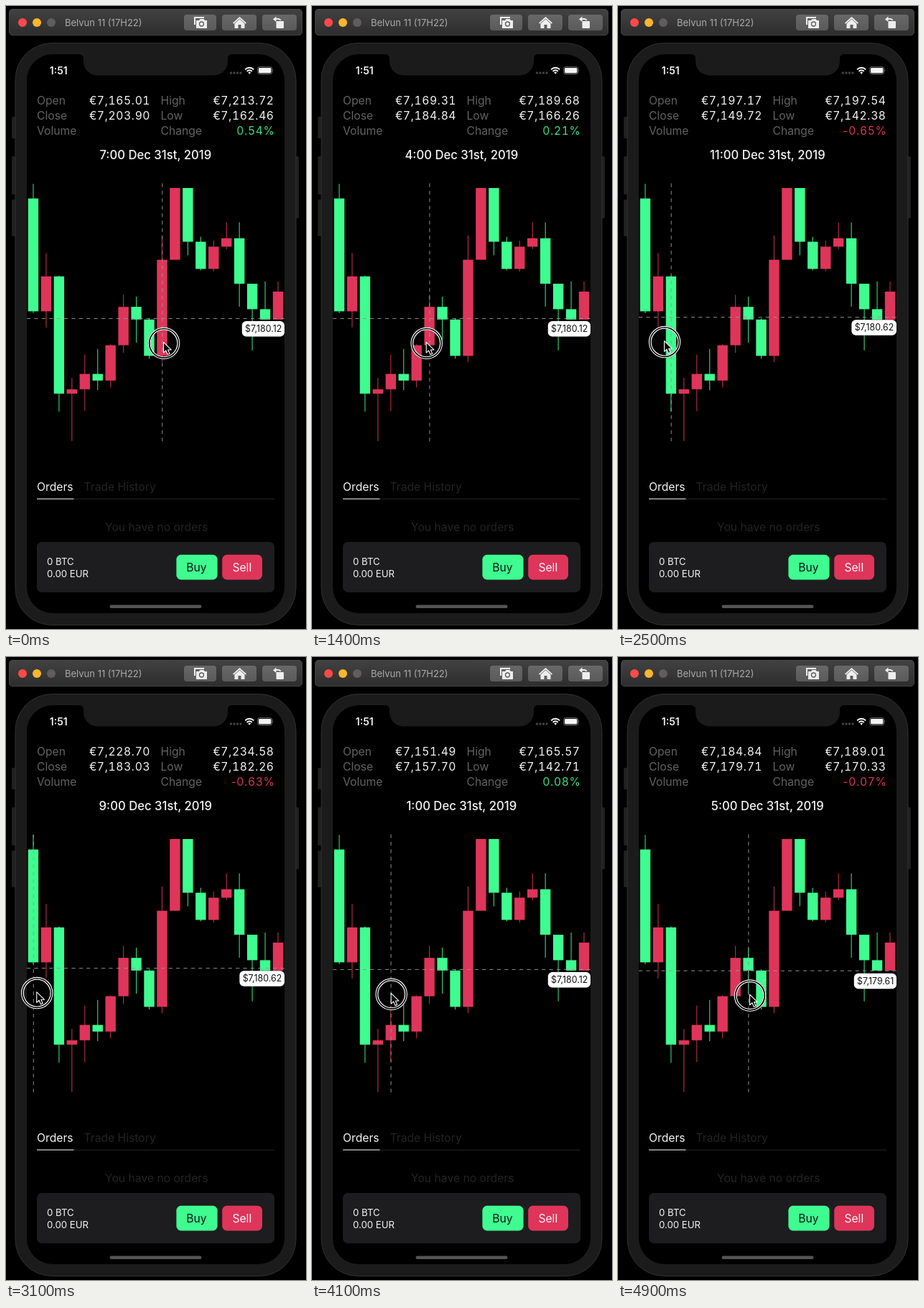
Animation of 418 by 866 pixels, one loop 5000 ms. Source, as an HTML page:

```html
<!DOCTYPE html>
<html lang="en">
<head>
<meta charset="utf-8">
<title>Candlestick chart</title>
<style>
  html, body { margin: 0; width: 100%; height: 100%; overflow: hidden; background: #000; }
  svg { display: block; width: 418px; height: 866px; font-family: Inter, "Open Sans", sans-serif; font-size: 15.7px; fill: #f4f4f4; }
  .dim { fill: #626264; }
  .faint { fill: #232325; }
  .value { text-anchor: end; letter-spacing: .5px; }
  .tab { font-variant-numeric: tabular-nums; }
  .mid { text-anchor: middle; }
  .line { fill: none; stroke: #fff; }
  .cross { stroke: #969696; stroke-width: .95; stroke-dasharray: 5.2 5.2; }
</style>
</head>
<body>
<svg viewBox="0 0 418 866">
  <defs>
    <linearGradient id="bar" x2="0" y2="1">
      <stop stop-color="#424242"/><stop offset="1" stop-color="#2d2d2d"/>
    </linearGradient>
    <linearGradient id="key" x2="0" y2="1">
      <stop stop-color="#686868"/><stop offset="1" stop-color="#5a5a5a"/>
    </linearGradient>
  </defs>
  <rect width="418" height="866" fill="#000"/>

  <!-- window bar -->
  <rect x="4.5" y="4.5" width="408" height="36" rx="4.5" fill="url(#bar)" stroke="#505050" stroke-width=".8"/>
  <circle cx="23" cy="23" r="6" fill="#fc4a48"/>
  <circle cx="43" cy="23" r="6" fill="#fdb52d"/>
  <circle cx="63" cy="23" r="6" fill="#605d5c"/>
  <text x="82" y="28" font-size="13" fill="#a9a9a9">Belvun 11 (17H22)</text>
  <g fill="url(#key)">
    <rect x="248" y="12" width="45" height="22" rx="4"/>
    <rect x="301" y="12" width="48" height="22" rx="4"/>
    <rect x="357" y="12" width="48" height="22" rx="4"/>
  </g>
  <g fill="#eee">
    <path d="M262 15h14v2h-12v9h-2z"/>
    <path d="M265 20h4l1.5-2h5l1.5 2h3v11h-15z"/>
    <circle cx="272.5" cy="25" r="3" stroke="#5d5d5d" stroke-width="1.3"/>
    <path d="M316 23.500 325.500 15 335 23.500 333.800 24.800 325.500 17.400 317.200 24.800z"/>
    <path d="M318.500 24.500 325.500 18.300 332.500 24.500V31h-5v-5h-4v5h-5z"/>
    <rect x="376.500" y="21" width="10.500" height="10" rx="1"/>
    <path d="M372 18.500 376.500 14.500V17H380a4 4 0 0 1 3.500 3h-2a2.500 2.500 0 0 0-2-1H376.500V22z"/>
  </g>

  <!-- handset -->
  <g fill="#202020">
    <rect x="8" y="154" width="8" height="30" rx="1.5"/>
    <rect x="8" y="209" width="8" height="53" rx="1.5"/>
    <rect x="8" y="269" width="8" height="51" rx="1.5"/>
    <rect x="400" y="209" width="8" height="86" rx="1.5"/>
  </g>
  <rect x="13" y="51.500" width="391" height="809" rx="51" fill="#1b1b1b" stroke="#303030"/>
  <rect x="29" y="67" width="359" height="777" rx="36" fill="#000"/>
  <path d="M102 67q6 .5 6 6v4a19.500 19.500 0 0 0 19.500 19.500H289.500A19.500 19.500 0 0 0 309 77v-4q0-5.500 6-6z" fill="#1b1b1b"/>

  <!-- status -->
  <text x="60.800" y="94.500" font-size="14" font-weight="600">1:51</text>
  <path d="M313.500 93H328" stroke="#434343" stroke-width="3.400" stroke-linecap="round" stroke-dasharray="0 4.500"/>
  <g class="line" stroke-width="1.900">
    <path d="M333.200 88.300a8.500 8.500 0 0 1 12 0"/>
    <path d="M335.600 90.800a5 5 0 0 1 7.200 0"/>
  </g>
  <path d="M337.200 92.300a3 3 0 0 1 4 0l-2 2.400z"/>
  <rect x="350.700" y="84.700" width="20" height="9.800" rx="2.600" class="line" stroke-opacity=".5" stroke-width=".9"/>
  <rect x="352" y="86" width="17.400" height="7.200" rx="1.400"/>
  <path d="M371.700 88q1.600 1.600 0 3.200z" fill="#777"/>

  <!-- readout -->
  <g class="dim">
    <text x="43" y="136.500">Open</text><text x="215.500" y="136.500">High</text>
    <text x="43" y="157.500">Close</text><text x="215.500" y="157.500">Low</text>
    <text x="43" y="178.500">Volume</text><text x="215.500" y="178.500">Change</text>
  </g>
  <g class="value">
    <text id="open" x="201" y="136.500"/><text id="high" x="373.500" y="136.500"/>
    <text id="close" x="201" y="157.500"/><text id="low" x="373.500" y="157.500"/>
    <text id="change" x="374.300" y="178.500"/>
  </g>
  <text id="date" class="mid" x="208.300" y="213" font-size="16.700" font-weight="500"/>

  <g id="candles"/>

  <!-- orders -->
  <text x="43" y="673.500">Orders</text>
  <text x="108.500" y="673.500" class="faint">Trade History</text>
  <rect x="43" y="684.800" width="331" height="1" fill="#252527"/>
  <rect x="43" y="684.600" width="51.500" height="1"/>
  <text x="209.800" y="729.800" class="mid faint">You have no orders</text>
  <rect x="43" y="745" width="331" height="70" rx="7" fill="#1d1d1f"/>
  <g font-size="13.200">
    <text x="57" y="776.500">0 BTC</text>
    <text x="57" y="793.500">0.00 EUR</text>
  </g>
  <rect x="237.400" y="762.800" width="57.200" height="34.700" rx="6.500" fill="#3ffc90"/>
  <rect x="301.200" y="762.800" width="55.800" height="34.700" rx="6.500" fill="#df355a"/>
  <text x="265.500" y="786.300" class="mid" fill="#101412">Buy</text>
  <text x="328.800" y="786.300" class="mid">Sell</text>
  <rect x="144.500" y="832.500" width="128" height="4.500" rx="2.250" fill="#555"/>

  <!-- crosshair and pointer -->
  <path id="vertical" class="cross" d="M0 246.500V605"/>
  <path id="horizontal" class="cross" d="M29 0H388"/>
  <g id="tag">
    <rect y="3.600" height="21.500" rx="6" fill="#fff"/>
    <text x="384.300" y="18.700" text-anchor="end" font-size="12.400" fill="#111"/>
  </g>
  <g id="pointer">
    <circle r="20.300" fill="none" stroke="#000" stroke-width="4"/>
    <circle r="21.700" class="line" stroke-width="1.100"/>
    <circle r="18.900" class="line" stroke-width="1.200"/>
    <path d="M-.5-1.500V13.200L2.900 10.100 5.300 15.600 8 14.400 5.600 9.100H10.200z" fill="#000" stroke="#fff" stroke-width="1.100" stroke-linejoin="round"/>
  </g>
</svg>

<script>
const $ = id => document.getElementById(id);
const GREEN = '#3ffc90', RED = '#df355a';
const LOOP = 5000, TICK = 100, LAG = 40;
const LEFT = 29, PITCH = 17.95;
const FIRST_OPEN = 7228.70, TOP_PRICE = 7180.62, PRICE_STEP = .1262;

// Each hour: close, then the wick above and below the body. It opens at the previous close.
const hours = [
  [7183.03, 5.88, .77], [7197.17, 9.5, 6.5], [7149.72, .37, 7.34], [7151.49, 4.6, 19.2],
  [7157.70, 7.87, 8.78], [7155.01, 10.06, 3.9], [7169.31, .4, 2.7], [7184.84, 4.84, 3.05],
  [7179.71, 4.17, 9.38], [7165.01, .5, 1.1], [7203.90, 9.82, 2.55], [7232.93],
  [7211.2, 0, 5.5], [7200.2, 2, .6], [7209.2, 2.5, 1], [7212.6, 6.4, 1],
  [7194.2, 6.4, 9.3], [7183.9, 0, 16.7], [7179.7, 11.2], [7191, 4.1],
];
const candles = hours.map(([close, above = 0, below = 0], i) => {
  const open = i ? hours[i - 1][0] : FIRST_OPEN;
  return { open, close, high: Math.max(open, close) + above, low: Math.min(open, close) - below };
});

const priceY = price => 319 + (7213.72 - price) * 3.435;
const slotX = i => LEFT + (i + .5) * PITCH;
const money = n => n.toLocaleString('en-US', { minimumFractionDigits: 2, maximumFractionDigits: 2 });

const ramp = (t, from, to) => Math.min(1, Math.max(0, (t - from) / (to - from)));
const easeOut = (u, power) => 1 - (1 - u) ** power;

// The pointer sweeps left, slows to a stop, then returns.
const comeBack = t => easeOut(ramp(t, 3500, 4900), 1.2);
const pointerX = t => 220 - 155 * ramp(t, 700, 2500)
  - 24.5 * easeOut(ramp(t, 2500, 3400), 2) + 143.5 * comeBack(t);
const priceSteps = t => Math.round(4 - 4 * ramp(t, 1400, 2100) + 8 * comeBack(t));

$('candles').innerHTML = candles.map(({ open, close, high, low }, i) => {
  const x = slotX(i), color = close < open ? GREEN : RED;
  const top = priceY(Math.max(open, close)), bottom = priceY(Math.min(open, close));
  return `<path d="M${x} ${priceY(high)}V${priceY(low)}" stroke="${color}" stroke-width="1.1" stroke-opacity=".85"/>
    <rect x="${x - 7.2}" y="${top}" width="14.4" height="${bottom - top}" fill="${color}"/>`;
}).join('');

// Only the digits are tabular; punctuation keeps its own width.
const setValue = (id, text) => {
  $(id).innerHTML = text.replace(/\d+/g, '<tspan class="tab">$&</tspan>');
};

function showCandle(i) {
  const { open, close } = candles[i];
  Object.entries(candles[i]).forEach(([id, price]) => setValue(id, '€' + money(price)));
  const change = Math.trunc((close - open) / open * 1e4) / 100;
  setValue('change', change.toFixed(2) + '%');
  $('change').style.fill = change < 0 ? '#d63354' : '#3bdd80';
  $('date').textContent = `${(i + 8) % 12 + 1}:00 Dec 31st, 2019`;
}

const move = (id, x, y) => $(id).setAttribute('transform', `translate(${x} ${y})`);

function render(time) {
  const t = Math.floor(time % LOOP / TICK) * TICK;
  const slot = Math.floor((pointerX(t - LAG) - LEFT) / PITCH);
  const price = TOP_PRICE - PRICE_STEP * priceSteps(t);
  const y = priceY(price);

  showCandle(slot);
  move('vertical', slotX(slot) + .3, 0);
  move('horizontal', 0, y);
  move('tag', 0, y);
  move('pointer', pointerX(t), y + 34.4);

  const [box, label] = $('tag').children;
  label.textContent = '$' + money(price);
  const width = label.getComputedTextLength() + 8;
  box.setAttribute('x', 388 - width);
  box.setAttribute('width', width);
}

const start = performance.now();
function frame() {
  render(performance.now() - start);
  requestAnimationFrame(frame);
}
frame();
</script>
</body>
</html>
```
